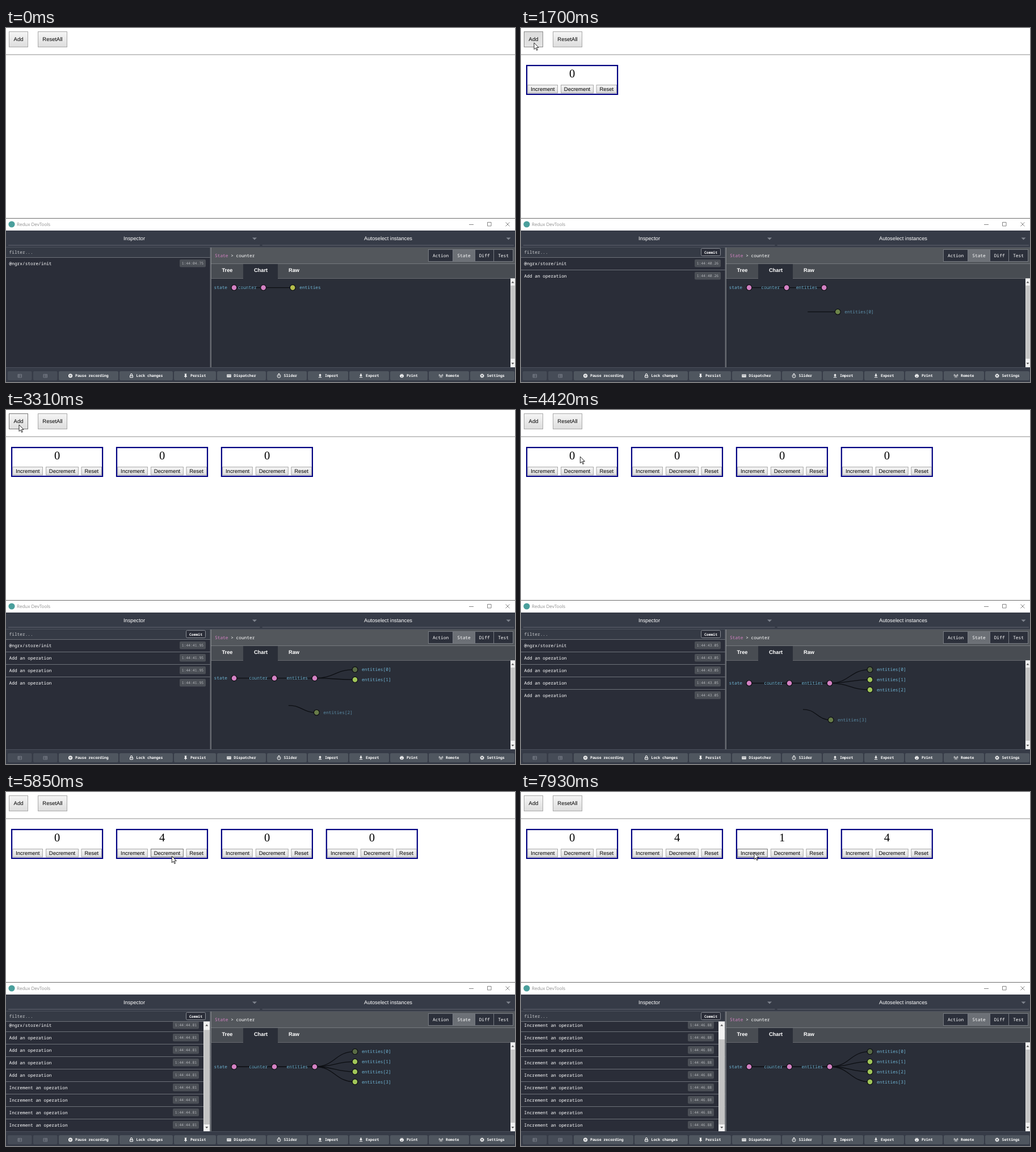
Write an HTML page that moves like this. It is 897 px wide and 624 px high and loops after 8000 ms.

```html
<!DOCTYPE html>
<html lang="en">
<head>
<meta charset="utf-8">
<title>Counter store</title>
<style>
html, body { margin: 0; width: 100%; height: 100%; overflow: hidden; background: #fff; }
svg { display: block; width: 897px; height: 624px; }
text { text-rendering: geometricPrecision; white-space: pre; }
.sans { font-family: "Liberation Sans", Arial, sans-serif; }
.serif { font-family: "Liberation Serif", Times, serif; }
.ui { font-family: "Open Sans", sans-serif; }
.mono { font-family: "Noto Sans Mono", "DejaVu Sans Mono", monospace; }
.mid { text-anchor: middle; }
.end { text-anchor: end; }
.b { font-weight: bold; }
.m { font-weight: 500; }
.btn { fill: url(#face); stroke: #a9a9a9; }
.btn.hover { stroke: #747474; }
.btn.down { fill: url(#faceDown); stroke: #8c8c8c; }
.link { fill: none; stroke: #0c0e12; stroke-width: 1.3; }
.icon { fill: none; stroke: #fff; stroke-width: 1; }
.icon .f { fill: #fff; stroke: none; }
</style>
</head>
<body>
<svg id="stage" viewBox="0 0 897 624" xmlns="http://www.w3.org/2000/svg"></svg>
<script>
const LOOP = 8000, MONO = 7.82, ROW = 22, LIST_TOP = 404, LIST_H = 194;
const BLUE = '#6fb3d2', PINK = '#d381c3', GREEN = '#a1c659';

// time, card (-1 adds a new one), seconds on the stamp
const actions = [
  [1250, -1, '40.26'], [1910, -1, '40.97'], [2878, -1, '41.95'], [3990, -1, '43.05'],
  [5080, 1, '44.13'], [5400, 1, '44.42'], [5590, 1, '44.62'], [5770, 1, '44.81'],
  [6490, 3, '45.55'], [6850, 3, '45.86'], [7060, 3, '46.08'], [7270, 3, '46.27'],
  [7820, 2, '46.88']
];
const adds = actions.filter(a => a[1] < 0).map(a => a[0]);

// time, x, y of the pointer
const path = [
  [100, 807, 609], [159, 807, 609], [160, 579, 412], [230, 579, 412], [1030, 23, 26],
  [4240, 23, 26], [4420, 104, 82], [4700, 200, 110], [4860, 219, 113], [5800, 219, 113],
  [6070, 607, 113], [6190, 607, 109], [7290, 607, 109], [7500, 411, 109], [7600, 411, 107]
];

const rect = (x, y, w, h, fill, more = '') =>
  `<rect x="${x}" y="${y}" width="${w}" height="${h}" fill="${fill}" ${more}/>`;
const text = (x, y, size, str, fill, cls, more = '') =>
  `<text x="${x}" y="${y}" font-size="${size}" fill="${fill}" class="${cls}" ${more}>${str}</text>`;
const line = (d, color, width = 1) =>
  `<path d="${d}" fill="none" stroke="${color}" stroke-width="${width}"/>`;
const shape = (d, fill) => `<path d="${d}" fill="${fill}"/>`;

const buttons = [];
function button(x, y, w, h, label, card = -1) {
  buttons.push({ x, y, w, h, card });
  return `<rect class="btn" x="${x + .5}" y="${y + .5}" width="${w - 1}" height="${h - 1}"/>` +
    text(x + w / 2, y + h / 2 + 3.3, 9.48, label, '#000', 'sans mid');
}

function card(i) {
  const x = 9 + 184.9 * i;
  return `<g class="card">` +
    `<rect x="${x + 1.1}" y="66.1" width="160" height="50.8" fill="#fff" stroke="#000080" stroke-width="2.2"/>` +
    text(x + 81.2, 86.6, 20.5, '0', '#000', 'serif mid count') +
    button(x + 2.5, 100, 53.5, 15, 'Increment', i) +
    button(x + 61, 100, 58, 15, 'Decrement', 9) +
    button(x + 123.5, 100, 36.5, 15, 'Reset', 9) + '</g>';
}

function page() {
  return rect(0, 0, 897, 336, '#fff') + button(5, 6, 34, 28, 'Add') +
    button(56, 6, 52, 28, 'ResetAll', 9) + rect(0, 46.5, 897, 1, '#8b8b8b') +
    [0, 1, 2, 3].map(card).join('') + rect(0, 335, 897, 1, '#6b6b6b');
}

function titleBar() {
  return rect(0, 336, 897, 21, '#fff') + '<circle cx="10" cy="346" r="5.6" fill="#4a9f9c"/>' +
    text(19, 349.2, 8, 'Redux DevTools', '#8c8c8c', 'ui') +
    line('M816 346.5h8M848.5 342.5h6.5v6.5h-6.5zM880.5 342.5l7 7M887.5 342.5l-7 7', '#777', .9);
}

function header() {
  const pick = (x, mid, end, label) =>
    text(mid, 374, 9.25, label, '#fff', 'sans mid') + rect(x, 382.5, end - x, 1, '#626772') +
    shape(`M${end - 13.5} 369.5h8l-4 4z`, '#7f848e');
  return rect(0, 357, 897, 30, '#363b47') + pick(4, 226, 447.5, 'Inspector') +
    pick(451.5, 673.5, 895, 'Autoselect instances') + rect(0, 386, 897, 1, '#4b505b');
}

function scrollBar(x, y, w, h, top, size, id) {
  const c = x + w / 2;
  return rect(x, y, w, h, '#f1f1f1') + rect(x + .5, top, w - 1, size, '#c4c4c4', `id="${id}"`) +
    shape(`M${c - 2.5} ${y + 8}h5l-2.5 -3z`, '#555') +
    shape(`M${c - 2.5} ${y + h - 8}h5l-2.5 3z`, '#555');
}

function list() {
  let rows = '';
  for (let i = 0; i < 10; i++) {
    const y = LIST_TOP + ROW * i;
    rows += '<g class="row">' + text(5.5, y + 13.8, MONO, '', '#fff', 'mono m') + '<g class="stamp">' +
      rect(306, y + 4, 46, 13.5, '#4b4f56', 'rx="2"') +
      text(329, y + 13.2, 6.4, '', '#b4b6ba', 'mono mid') + '</g>' +
      rect(0, y + ROW, 360, 1, '#6e727a') + '</g>';
  }
  return rect(0, 387, 360, 211, '#2a2d38') + rect(0, 387, 360, 17, '#353a45') +
    text(5.5, 398, MONO, 'filter...', '#c4c6c9', 'mono') +
    `<g id="commit">` + rect(317.5, 388.5, 34, 13, '#2a2d38', 'rx="2" stroke="#8b8f96"') +
    text(334.5, 397.5, 6.4, 'Commit', '#fff', 'mono mid b') + '</g>' +
    `<g clip-path="url(#listClip)"><g id="rows">${rows}</g></g>` +
    rect(0, 404, 360, 1, '#6e727a') +
    `<g id="listBar">${scrollBar(348, 404.5, 11.5, 193.5, 416, 170, 'thumb')}</g>` +
    rect(359.5, 387, 2, 211, '#62666d');
}

function inspector() {
  const tabs = [['Action', 744, 43], ['State', 787, 39], ['Diff', 826, 33], ['Test', 859, 34]];
  return rect(361.5, 387, 535.5, 28, '#53575c') +
    text(368, 404, MONO, `<tspan fill="${PINK}">State</tspan> &gt; counter`, '#fff', 'mono m') +
    tabs.map(([label, x, w]) =>
      rect(x + .5, 390.5, w, 21, label === 'State' ? '#6c7076' : '#2c303b', 'stroke="#777b82"') +
      text(x + w / 2 + .5, 403.8, MONO, label, '#fff', 'mono mid m')).join('') +
    rect(361.5, 415, 535.5, 1, '#74787d') + rect(361.5, 416, 535.5, 25.5, '#484c52') +
    rect(418, 416, 61, 26, '#2a2e38') +
    [['Tree', 390], ['Chart', 449], ['Raw', 507.5]].map(([s, x]) =>
      text(x, 430, 9.25, s, '#fff', 'sans mid b')).join('') +
    rect(361.5, 441.5, 527.5, 156.5, '#2a2e38') + '<g id="chart" clip-path="url(#chartClip)"></g>' +
    scrollBar(889, 441.5, 8, 156.5, 454, 129, 'side');
}

const icons = {
  pause: '<circle class="f" r="3.5"/><path stroke="#4f565f" d="M-1-1.6v3.2M1-1.6v3.2"/>',
  lock: '<path d="M-2.5-.5h5v3.5h-5zM-1.5-.5v-1.6a1.5 1.5 0 0 1 3 0v1.6M0 .8v1"/>',
  pin: '<path class="f" d="M-1.8-3.4h3.6v1h-.6v2.2l1.2 1.2v.8h-2v2.2h-.8v-2.2h-2v-.8l1.2-1.2v-2.2h-.6z"/>',
  keys: '<path class="f" d="M-3.7-2.4h7.4v5h-7.4z"/><path stroke="#4f565f" stroke-width=".8" d="M-2.7-.9h5.4M-2.7.4h5.4" stroke-dasharray="1 .5"/>',
  watch: '<circle cy=".5" r="2.9"/><path d="M0-1v1.8M-1.2-3.6h2.4"/>',
  up: '<path class="f" d="M0-3.4l2.6 2.6h-1.6v2.2h-2v-2.2h-1.6zM-2.7 2.3h5.4v1h-5.4z"/>',
  down: '<path class="f" d="M0 1.4l2.6-2.4h-1.6v-2.4h-2v2.4h-1.6zM-2.7 2.3h5.4v1h-5.4z"/>',
  print: '<path class="f" d="M-2.2-3.1h4.4v1.4h-4.4zM-3.4-1.2h6.8v3h-1.2v1.4h-4.4v-1.4h-1.2z"/><path stroke="#4f565f" d="M-1.3 1.5h2.6"/>',
  radio: '<path stroke-width=".8" d="M-2.6-3a4 4 0 0 0 0 4.4M2.6-3a4 4 0 0 1 0 4.4M-1.3-2a2 2 0 0 0 0 2.4M1.3-2a2 2 0 0 1 0 2.4M0-.6l-1.6 4.2M0-.6l1.6 4.2"/>',
  gear: '<circle r="2.1" stroke-width="1.5"/><circle r="3.3" stroke-dasharray="1.3 1.29"/>'
};

function toolbar() {
  const items = [
    [93, 105, 122, 'Pause recording', 'pause'], [200, 94, 229.5, 'Lock changes', 'lock'],
    [296, 74, 325, 'Persist', 'pin'], [372, 86, 401.5, 'Dispatcher', 'keys'],
    [460, 70, 489.5, 'Slider', 'watch'], [532, 71, 562, 'Import', 'up'],
    [605, 70, 634, 'Export', 'down'], [677, 66, 706, 'Print', 'print'],
    [745, 71, 775, 'Remote', 'radio'], [818, 78, 847.5, 'Settings', 'gear']
  ];
  const face = (x, w, fill) => rect(x, 605, w, 16, fill, 'rx="2"');
  const panes = (x, dir) => face(x, 42.5, '#464c57') +
    line(`M${x + 18} 610.5h6.5v5.5h-6.5zM${x + 21 + dir} 610.5v5.5M${x + 18} 613h6.5`, '#828791', .8);
  return rect(0, 598, 897, 26, '#363b47') + rect(0, 598, 897, 1, '#4b505b') +
    panes(3, -1) + panes(48, 1) +
    items.map(([x, w, tx, label, icon]) => face(x, w, '#4f565f') +
      `<g class="icon" transform="translate(${tx - 8.5} 613)">${icons[icon]}</g>` +
      text(tx, 615.4, 6.53, label, '#fff', 'mono b')).join('');
}

const grad = (id, a, b) =>
  `<linearGradient id="${id}" x2="0" y2="1"><stop stop-color="${a}"/><stop offset="1" stop-color="${b}"/></linearGradient>`;

const stage = document.getElementById('stage');
stage.innerHTML = '<defs>' + grad('face', '#f5f5f5', '#dddddd') + grad('faceDown', '#dcdcdc', '#e4e4e4') +
  `<clipPath id="listClip">${rect(0, 404, 360, 194, '#000')}</clipPath>` +
  `<clipPath id="chartClip">${rect(361.5, 441.5, 527.5, 156.5, '#000')}</clipPath></defs>` +
  page() + titleBar() + header() + list() + inspector() + toolbar() +
  '<path id="pointer" d="M0 0V11.6L2.7 9.1 4.6 13.4 6.3 12.6 4.4 8.4H8Z" fill="#fff" stroke="#111" stroke-width=".9"/>';

const $ = id => document.getElementById(id);
const all = sel => [...stage.querySelectorAll(sel)];
const cards = all('.card'), counts = all('.count'), faces = all('.btn');
const rows = all('.row').map(g => ({
  g, label: g.querySelector('text'), stamp: g.querySelector('.stamp'),
  time: g.querySelector('.stamp text'), rule: g.lastChild
}));

const show = (el, on) => el.setAttribute('visibility', on ? 'visible' : 'hidden');
const mix = (a, b, k) => a + (b - a) * k;
const clamp = k => Math.max(0, Math.min(1, k));
const ease = k => (k = clamp(k)) < .5 ? 4 * k ** 3 : 1 - 4 * (1 - k) ** 3;

function pointerAt(t) {
  const i = path.findIndex(p => p[0] > t);
  if (i < 0) return path[path.length - 1].slice(1);
  if (i === 0) return null;
  const [a, b] = [path[i - 1], path[i]], k = (t - a[0]) / (b[0] - a[0]);
  return [mix(a[1], b[1], k), mix(a[2], b[2], k)];
}

function drawButtons(t, pos) {
  const next = actions.find(a => a[0] > t);
  buttons.forEach((b, i) => {
    const over = pos && pos[0] >= b.x && pos[0] <= b.x + b.w && pos[1] >= b.y && pos[1] <= b.y + b.h;
    const down = over && next && next[1] === b.card && next[0] - t < 215;
    faces[i].setAttribute('class', 'btn' + (down ? ' down' : over ? ' hover' : ''));
  });
}

function drawList(done) {
  const names = ['@ngrx/store/init',
    ...done.map(a => (a[1] < 0 ? 'Add' : 'Increment') + ' an operation').slice(-9)];
  const n = names.length, over = Math.max(0, n * ROW - LIST_H);
  const stamp = '1:44:' + (done.length ? done[done.length - 1][2] : '04.75');
  rows.forEach((r, i) => {
    show(r.g, i < n);
    r.label.textContent = names[i] || '';
    r.time.textContent = stamp;
    r.stamp.setAttribute('transform', `translate(${over ? -12 : 0} 0)`);
    r.rule.setAttribute('height', i < n - 1 ? 1 : 0);
  });
  $('rows').setAttribute('transform', `translate(0 ${-over})`);
  const size = 170 * LIST_H / (LIST_H + over);
  $('thumb').setAttribute('y', 586 - size);
  $('thumb').setAttribute('height', size);
  show($('listBar'), over > 0);
  show($('commit'), done.length > 0);
}

function drawChart(t) {
  const n = adds.filter(a => a <= t).length;
  const since = n ? t - adds[n - 1] : 0, k = n ? ease(since / 750) : 1;
  const leafY = i => 457.6 + 17.75 * i;
  const midY = c => leafY(Math.max(0, c - 1) / 2);
  const gap = c => c ? 71 : 51.6;
  const y = mix(midY(Math.max(0, n - 1)), midY(n), k);
  const step = mix(gap(n - 1 > 0 ? 1 : 0), gap(n), k);
  const link = (x1, y1, x2, y2) => {
    const m = (x1 + x2) / 2;
    return `<path class="link" d="M${x1} ${y1}C${m} ${y1} ${m} ${y2} ${x2} ${y2}"/>`;
  };
  let links = '', nodes = '';
  const node = (x, y, label, fill, leaf, fade = 1, glow = 1) => {
    nodes += `<circle cx="${x}" cy="${y}" r="4.9" fill="#2a2e38"/>` +
      `<circle cx="${x}" cy="${y}" r="4.9" fill="${fill}" fill-opacity="${glow}" stroke="#0c0e12" stroke-width="1.2"/>` +
      text(x + (leaf ? 12 : -12), y + 2.8, MONO, label, BLUE, 'mono' + (leaf ? '' : ' end'), `fill-opacity="${fade}"`);
  };
  const xs = [0, 1, 2].map(d => 402 + step * d);
  links += link(xs[0], y, xs[1], y) + link(xs[1], y, xs[2], y);
  node(xs[0], y, 'state', PINK);
  node(xs[1], y, 'counter', PINK);
  node(xs[2], y, 'entities', n ? PINK : '#b5bd4c', !n);
  for (let i = 0; i < n; i++) {
    const fresh = i === n - 1;
    // a new leaf and both ends of its link fly in from below
    const fly = (x, y) => fresh ? [mix(391, x, k), mix(626, y, k)] : [x, y];
    const from = fresh ? fly(544, midY(n)) : [xs[2], y], to = fly(615, leafY(i));
    const glow = fresh ? .3 + .7 * ease((since - 110) / 750) : i ? 1 : .4;
    links += link(...from, ...to);
    node(...to, `entities[${i}]`, GREEN, true, fresh ? k : 1, glow);
  }
  $('chart').innerHTML = links + nodes;
}

function draw(t) {
  const done = actions.filter(a => a[0] <= t), pos = pointerAt(t);
  const n = done.filter(a => a[1] < 0).length;
  cards.forEach((c, i) => {
    show(c, i < n);
    counts[i].textContent = done.filter(a => a[1] === i).length;
  });
  drawButtons(t, pos);
  drawList(done);
  drawChart(t);
  show($('pointer'), !!pos);
  if (pos) $('pointer').setAttribute('transform', `translate(${pos})`);
}

const start = performance.now();
function tick() {
  draw((performance.now() - start) % LOOP);
  requestAnimationFrame(tick);
}
tick();
</script>
</body>
</html>
```
